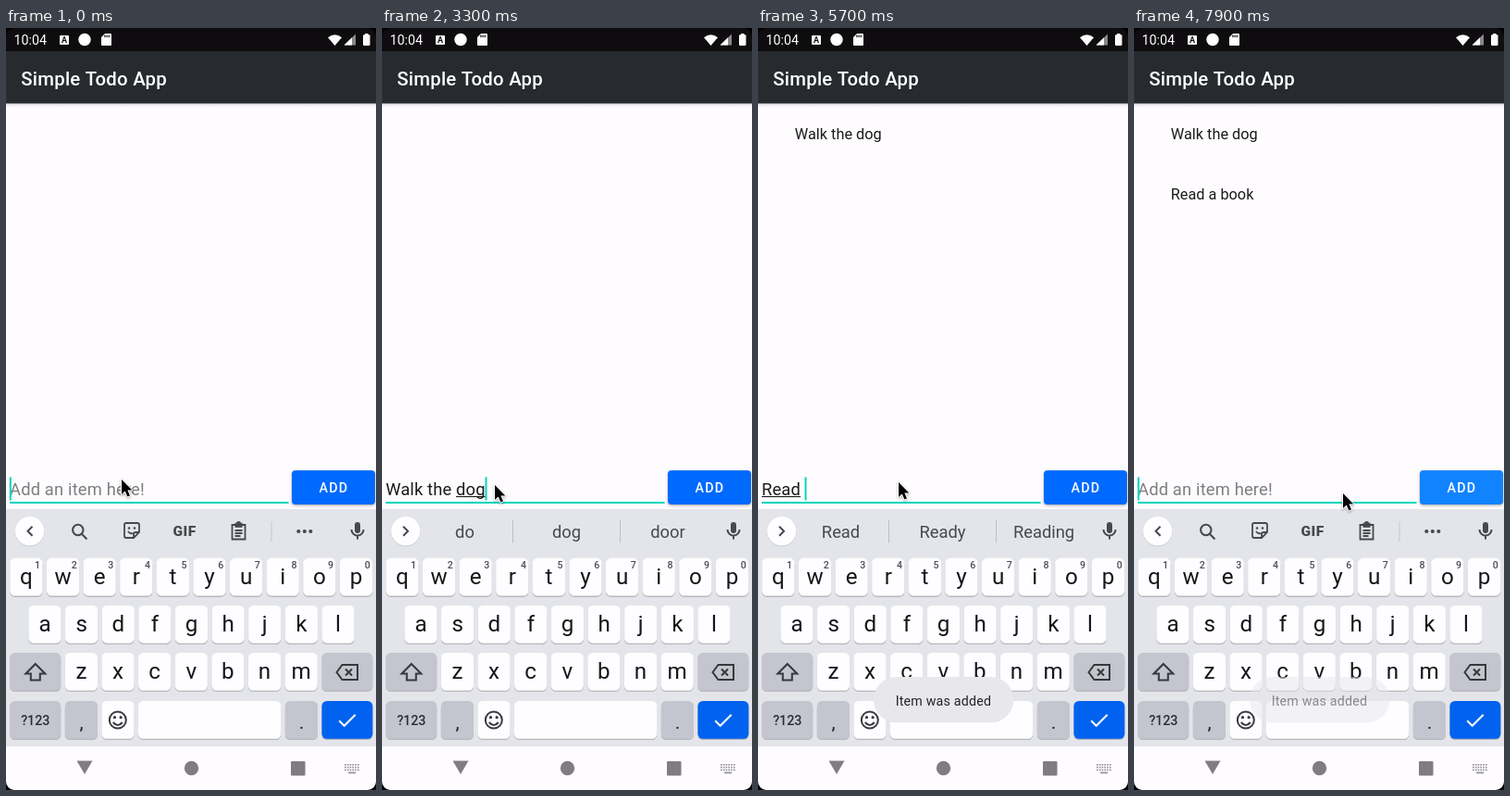
Animation, 400 px wide and 822 px high, one loop 8000 ms. Source, as an HTML page with a canvas:

```html
<!DOCTYPE html>
<html lang="en">
<head>
<meta charset="utf-8">
<title>Todo list</title>
<style>
html, body { margin: 0; width: 100%; height: 100%; overflow: hidden; background: #fefcfe; }
canvas { display: block; width: 400px; height: 822px; }
</style>
</head>
<body>
<canvas id="stage"></canvas>
<script>
const W = 400, H = 822, LOOP = 8000, STEP = 100;
const canvas = document.getElementById('stage');
const dpr = window.devicePixelRatio || 1;
canvas.width = W * dpr;
canvas.height = H * dpr;
const c = canvas.getContext('2d');
const INK = '#47494d', TEAL = '#08d5be', KEY = '#fefdff', DARK_KEY = '#c5c5cf';

// Each entry: words typed, time of first letter, second burst (index, time, gap), time of adding
const entries = [
  { text: 'Walk the dog', start: 1500, next: 2400, gap: 150, add: 4000 },
  { text: 'Read a book', start: 4900, next: 5900, gap: 200, add: 7700 }
];
const hints = {
  'W': 'We What Was', 'Wa': 'Was Want Wait', 'Wal': 'Walk Wall Wallet',
  'Walk': 'Walk Wall Walking', 'Walk ': 'in to the',
  't': 'to the this', 'th': 'the that this', 'the': 'the then they', 'the ': 'dog door way',
  'd': 'do day did', 'do': 'do dog door', 'dog': 'dog dogs doggy',
  'R': 'Right Really Read', 'Re': 'Really Read Red', 'Rea': 'Read Really Ready',
  'Read': 'Read Ready Reading', 'Read ': 'the it a',
  'a': 'a and at', 'a ': 'book lot few',
  'b': 'be but book', 'bo': 'both box book', 'boo': 'book boot books', 'book': 'book booking booklet'
};
const pointerPath = [
  [0, 125, 487], [200, 125, 487], [500, 122, 493], [3400, 122, 493], [3700, 342, 494],
  [4000, 342, 494], [4400, 152, 490], [6800, 152, 490], [7000, 165, 487], [7300, 342, 494],
  [7700, 342, 494], [7900, 226, 502], [8000, 180, 500]
];

const clamp = v => Math.max(0, Math.min(1, v));

function charTime(e, i) {
  return i < 5 ? e.start + 200 * i : e.next + e.gap * (i - 5);
}

function typed(t) {
  for (const e of entries) {
    if (t >= e.start && t < e.add) {
      let n = 0;
      while (n < e.text.length && charTime(e, n) <= t) n++;
      return { text: e.text.slice(0, n), last: charTime(e, n - 1) };
    }
  }
  const done = entries.filter(e => t >= e.add).pop();
  return { text: '', last: done ? done.add : 0 };
}

function pointerAt(t) {
  const i = pointerPath.findIndex(p => p[0] > t);
  const a = pointerPath[i - 1], b = pointerPath[i];
  const k = (t - a[0]) / (b[0] - a[0]);
  return [a[1] + (b[1] - a[1]) * k, a[2] + (b[2] - a[2]) * k];
}

function text(s, x, y, size, color, { weight = 400, align = 'left', space = 0 } = {}) {
  c.font = `${weight} ${size}px Roboto, sans-serif`;
  c.letterSpacing = space + 'px';
  c.textAlign = align;
  c.fillStyle = color;
  c.fillText(s, x, y);
}

function rect(x, y, w, h, color) {
  c.fillStyle = color;
  c.fillRect(x, y, w, h);
}

function round(x, y, w, h, r, color) {
  c.beginPath();
  c.roundRect(x, y, w, h, r);
  c.fillStyle = color;
  c.fill();
}

function disc(x, y, r, color) {
  c.beginPath();
  c.arc(x, y, r, 0, 7);
  c.fillStyle = color;
  c.fill();
}

function fill(d, x, y, color) {
  c.save();
  c.translate(x, y);
  c.fillStyle = color;
  c.fill(new Path2D(d));
  c.restore();
}

function line(d, x, y, color = INK, width = 2) {
  c.save();
  c.translate(x, y);
  c.strokeStyle = color;
  c.lineWidth = width;
  c.stroke(new Path2D(d));
  c.restore();
}

function statusBar() {
  rect(0, 0, W, 25, '#0e0c0e');
  text('10:04', 8.5, 17.6, 14.26, '#fff');
  round(58, 8, 10, 10, 1, '#fff');
  text('A', 63, 16.3, 9, '#0e0c0e', { weight: 700, align: 'center' });
  disc(85, 12.5, 6.7, '#fff');
  fill('M4 0H10Q11 0 11 1V12Q11 13 10 13H1Q0 13 0 12V4Z', 103, 6, '#fff');
  for (let i = 0; i < 3; i++) rect(106.3 + i * 2.2, 7.5, 1.2, 2.6, '#0e0c0e');
  fill('M0 3.2Q7.5 -2.6 15 3.2L7.5 12Z', 348, 7, '#fff');
  fill('M0 12L12.5 0V12Z', 365.5, 6.5, '#8b898b');
  fill('M0 12L8.5 3.8V12Z', 365.5, 6.5, '#fff');
  round(386, 7.3, 7.5, 11.7, 1, '#fff');
  rect(388, 6, 3.5, 2, '#fff');
}

function appBar() {
  const g = c.createLinearGradient(0, 81, 0, 86);
  g.addColorStop(0, '#c9c8ca');
  g.addColorStop(.4, '#eeecee');
  g.addColorStop(1, '#fefcfe');
  rect(0, 81, W, 5, g);
  rect(0, 25, W, 56.4, '#272a2e');
  text('Simple Todo App', 16.2, 61.5, 20.37, '#fff', { weight: 500, space: .25 });
}

function inputRow(t) {
  const { text: value, last } = typed(t);
  const baseline = 503.5, font = 18.33, opt = { space: .17 };
  if (value) {
    text(value, 4, baseline, font, '#1c1b1c', opt);
    // The word being composed stays underlined until the keyboard catches up
    const shown = value.endsWith(' ') ? (t - last < STEP ? value.trimEnd() : '') : value;
    if (shown) {
      const from = c.measureText(shown.slice(0, shown.lastIndexOf(' ') + 1)).width;
      rect(4 + from, 505, c.measureText(shown).width - from, 1.1, '#1c1b1c');
    }
  } else {
    text('Add an item here!', 4, baseline, font, '#7e7d7f', opt);
  }
  rect(4, 511, 301.5, 2.1, TEAL);
  if ((t - last) % 1000 < 500) {
    const w = value ? c.measureText(value).width : 0;
    rect(3.8 + w, 484.5, 2, 25, TEAL);
  }

  c.save();
  c.shadowColor = 'rgba(0,0,0,.35)';
  c.shadowBlur = 3 * dpr;
  c.shadowOffsetY = 1 * dpr;
  round(309, 477.3, 90, 36.7, 4, '#006aff');
  c.restore();
  for (const e of entries) {
    const p = (t - e.add) / 500;
    if (p >= 0 && p < 1) round(309, 477.3, 90, 36.7, 4, `rgba(60,190,255,${.5 * (1 - p)})`);
  }
  text('ADD', 338.4, 501.4, 14.26, '#fff', { weight: 500, space: 1.27 });
}

function mic(x, y) {
  round(x - 3, y - 9.5, 6, 12, 3, INK);
  line('M-6.5 -1.5A6.5 6.5 0 0 0 6.5 -1.5M0 5V9', x, y);
}

function toolbar() {
  line('M3 -5L-2 0L3 5', 25.5, 542.7);
  line('M3.6 3.6L9 9M5 -1A5.7 5.7 0 1 1 -6.4 -1A5.7 5.7 0 1 1 5 -1', 78.5, 542.5, INK, 2.1);
  line('M-6 -8H6Q8 -8 8 -6V2L2 8H-6Q-8 8 -8 6V-6Q-8 -8 -6 -8ZM8 2H4Q2 2 2 4V8M-4 1Q-2 4 1 3', 136, 542, INK, 1.8);
  disc(133, 539.5, 1.3, INK);
  disc(139, 539.5, 1.3, INK);
  text('GIF', 180.5, 548, 15.5, INK, { weight: 900, space: .5 });
  line('M-7 -7H7V8.5H-7ZM-4 -1H4M-4 2H4M-4 5H2', 251.5, 543, INK, 1.8);
  rect(247.5, 533.8, 8, 5, INK);
  disc(251.5, 534.3, 2.4, INK);
  rect(286.5, 532, 1, 22, '#c8c9ce');
  for (let i = -1; i < 2; i++) disc(322.8 + i * 6.5, 543, 2.1, INK);
}

function suggestions(value) {
  line('M-2.5 -5L2.5 0L-2.5 5', 25.5, 542.7);
  const key = value.match(/\S+ ?$/)[0];
  const words = (hints[key] || '').split(' ');
  [89.5, 199.5, 309].forEach((x, i) => text(words[i] || '', x, 550, 18.33, INK, { align: 'center' }));
  rect(141, 530.5, 1, 25, '#bfc0c6');
  rect(257, 530.5, 1, 25, '#bfc0c6');
}

function key(x, y, w, color = KEY) {
  round(x, y + 1.3, w, 40.8, 5.5, '#b6b8be');
  round(x, y, w, 40.8, 5.5, color);
}

function letters(row, x0, y, digits) {
  [...row].forEach((ch, i) => {
    const x = x0 + i * 39.62;
    key(x, y, 35.2);
    text(ch, x + 17.6, y + 28, 24.2, '#161618', { align: 'center' });
    if (digits) text(digits[i], x + 29.8, y + 11.3, 10.6, '#4c4d52', { align: 'center', weight: 500 });
  });
}

function keyboard(t) {
  rect(0, 519, W, 256, '#e4e5ea');
  disc(25.6, 543.5, 15.8, '#cfd0d5');
  disc(25.6, 542.7, 15.6, KEY);
  // The strip trails the typing by one step
  const value = typed(t).text && typed(t - STEP).text;
  if (value) suggestions(value); else toolbar();
  mic(380, 542.5);

  letters('qwertyuiop', 4.3, 571.8, '1234567890');
  letters('asdfghjkl', 24.4, 622.9);
  letters('zxcvbnm', 63.8, 674);

  key(4.3, 674, 55, DARK_KEY);
  line('M0 -9.5L10.5 1H5V8H-5V1H-10.5Z', 31.8, 695.5, '#37383c', 2);
  key(341.4, 674, 55, DARK_KEY);
  line('M-11.5 0L-5.5 -8H11V8H-5.5ZM-2 -3.5L5 3.5M5 -3.5L-2 3.5', 369, 695, '#37383c', 2);

  key(4.3, 726, 55, DARK_KEY);
  text('?123', 31.8, 752.3, 14.3, '#2c2d31', { align: 'center', weight: 500 });
  key(63.8, 726, 35.2, DARK_KEY);
  text(',', 81.6, 756, 21, '#222327', { align: 'center' });
  key(103.4, 726, 35.2);
  line('M9 0A9 9 0 1 1 -9 0A9 9 0 1 1 9 0M-5 2.5Q0 8.5 5 2.5', 120.8, 746.5, '#37383c', 2);
  disc(117.5, 743.7, 1.6, '#37383c');
  disc(124.1, 743.7, 1.6, '#37383c');
  key(143, 726, 154.3);
  key(301.8, 726, 35.2, DARK_KEY);
  text('.', 319.4, 756, 21, '#222327', { align: 'center' });
  key(341.4, 726, 55, '#0062ee');
  line('M-8.5 0L-3 5.5L9 -6.5', 368.7, 747.3, '#fff', 2);
}

function navBar() {
  rect(0, 775, W, 47, '#fefcfe');
  fill('M-8.5 -7H8.5L0 7.5Z', 85, 797.5, '#7f7d80');
  disc(200.5, 798.5, 7.7, '#7f7d80');
  round(308, 791, 15.5, 15.5, 1, '#7f7d80');
  for (let r = 0; r < 3; r++)
    for (let i = 0; i < 6; i++) rect(366 + i * 2.8, 794 + r * 2.8, 1.6, 1.6, '#8d8b8e');
  rect(370, 802.6, 8, 1.6, '#8d8b8e');
}

function toast(t) {
  for (const e of entries) {
    const s = t - e.add;
    const a = Math.min(clamp((s - 100) / 200), clamp((2300 - s) / 200));
    if (a <= 0) continue;
    c.globalAlpha = a;
    round(125, 700, 151.3, 49.3, 24.6, '#e8e8ea');
    text('Item was added', 148.7, 730.7, 14.26, '#252427', { space: .18 });
    c.globalAlpha = 1;
  }
}

function pointer(t) {
  const [x, y] = pointerAt(t);
  const d = 'M0 0V16L3.7 12.6L6.3 18.6L9 17.4L6.4 11.6H11.3Z';
  c.save();
  c.shadowColor = 'rgba(0,0,0,.35)';
  c.shadowBlur = 2.5 * dpr;
  c.shadowOffsetY = 1 * dpr;
  c.lineJoin = 'round';
  line(d, x, y, '#fff', 2);
  c.restore();
  fill(d, x, y, '#000');
}

function corners() {
  const r = 9;
  c.beginPath();
  c.rect(0, 0, W, H);
  c.roundRect(0, 0, W, H, r);
  c.fillStyle = '#000';
  c.fill('evenodd');
}

function draw(t) {
  c.setTransform(dpr, 0, 0, dpr, 0, 0);
  rect(0, 0, W, H, '#fefcfe');
  appBar();
  statusBar();
  entries.forEach((e, i) => {
    if (t >= e.add) text(e.text, 39.8, 119.5 + i * 65.2, 16.3, '#1c1b1c');
  });
  inputRow(t);
  keyboard(t);
  navBar();
  toast(t);
  pointer(t);
  corners();
}

const began = performance.now();
function tick() {
  const t = (performance.now() - began) % LOOP;
  draw(Math.floor(t / STEP) * STEP);
  requestAnimationFrame(tick);
}
tick();
</script>
</body>
</html>
```
